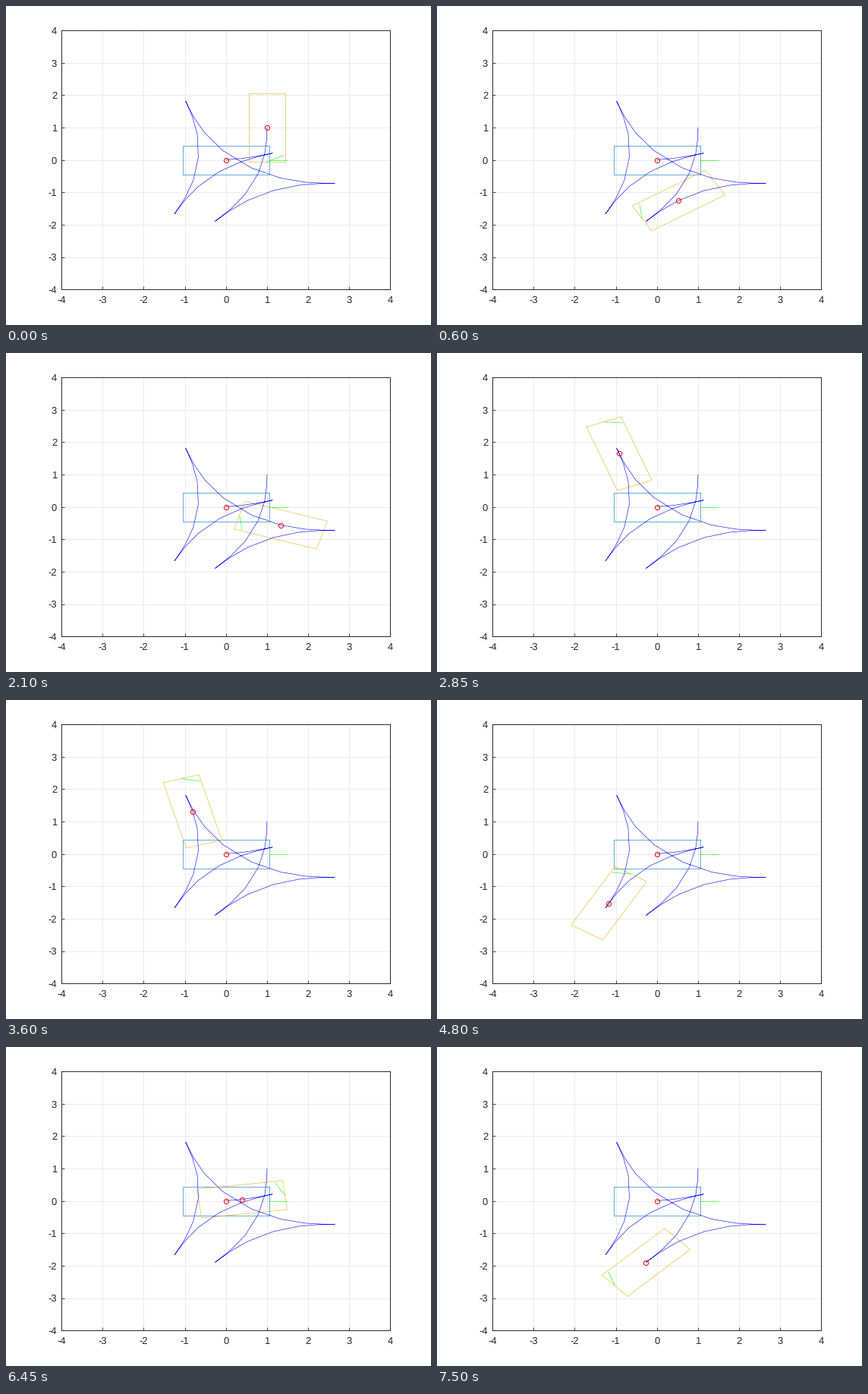
Write a matplotlib script that moves like this. It is 560x420 px and loops after 7.65 s.

```python
import numpy as np
import matplotlib.pyplot as plt
from matplotlib.animation import FuncAnimation

W, H, DPI = 560, 420, 100
PX = 72 / DPI
STEPS = 51
INTERVAL = 150
RAMP = 3.4          # steps the steering needs to reach full lock
PACE = 4.755        # steps per square root of travelled length
# x, y and heading in degrees wherever the car changes direction
CUSPS = [(1, 1, -90), (-.275, -1.905, -136.4), (2.652, -.721, -180.3),
         (-.988, 1.838, -250), (-1.256, -1.676, -299.7),
         (1.135, .212, -345), (0, .01, -356)]


def plan_route():
    """Alternate forward and reverse legs, each with a triangular speed profile."""
    u = np.linspace(0, 1, 401)
    speed = 1 - abs(2 * u - 1)
    legs, start = [], 0.0
    for k, (a, b) in enumerate(zip(CUSPS, CUSPS[1:])):
        sign = 1 if k % 2 == 0 else -1
        chord = complex(b[0] - a[0], b[1] - a[1])
        turn = np.radians(b[2] - a[2])
        duration = PACE * np.sqrt(abs(chord) * (1 + turn ** 2 / 22))
        lock = np.minimum(1, speed * duration / 2 / RAMP)
        swing = np.cumsum(lock * speed)
        theta = np.radians(a[2]) + turn * swing / swing[-1]
        trail = np.cumsum(speed * np.exp(1j * theta))
        place = complex(a[0], a[1]) + trail * chord / trail[-1]
        accel = np.where(u < .5, sign, -sign)
        legs.append((start + u * duration, place.real, place.imag, theta, accel))
        start += duration
    return np.hstack(legs)


time, *route, push = plan_route()
poses = np.array([np.interp(np.arange(STEPS), time, part) for part in route]).T


def car(x, y, heading, wheel):
    """Outline of the body and the wheel line at its nose."""
    c, s = np.cos(heading), np.sin(heading)
    fx = np.array([1.05, 1.05, -1.05, -1.05, 1.05])
    fy = np.array([.45, -.45, -.45, .45, .45])
    body = x + c * fx - s * fy, y + s * fx + c * fy
    nx, ny = x + 1.05 * c, y + 1.05 * s
    aim = heading + wheel
    nose = [nx, nx + .45 * np.cos(aim)], [ny, ny + .45 * np.sin(aim)]
    return body, nose


plt.rcParams.update({"font.family": "Liberation Sans", "font.size": 13.3 * PX,
                     "axes.unicode_minus": False, "text.hinting": "no_hinting",
                     "text.hinting_factor": 1})
fig = plt.figure(figsize=(W / DPI, H / DPI), dpi=DPI, facecolor="white")
ax = fig.add_axes([73.2 / W, 46.7 / H, 433.1 / W, 341.1 / H])
ax.set(xlim=(-4, 4), ylim=(-4, 4), xticks=range(-4, 5), yticks=range(-4, 5))
ax.set_axisbelow(True)
ax.grid(color="#e6e6e6", lw=.6)
ax.tick_params(direction="in", length=4 * PX, width=.6, pad=6 * PX,
               color="#262626", labelcolor="#262626")
ax.tick_params(axis="x", pad=8.5 * PX)
for spine in ax.spines.values():
    spine.set(linewidth=.7, color="#262626")


def thin(color, data=((), ()), z=3):
    return ax.plot(*data, color=color, lw=.42, zorder=z, clip_on=False)[0]


def ring(x=0, y=0):
    return ax.plot([x], [y], "o", ms=6.2 * PX, mfc="none", mec="red",
                   mew=.72, zorder=6)[0]


goal_body, goal_nose = car(0, 0, 0, 0)
thin("#0072bd", goal_body)
thin("#00ff00", goal_nose)
ring()
thin("#0000ff", poses.T[:2], 5)
body_line = thin("#edb120", z=4)
nose_line = thin("#00ff00", z=4)
mover = ring()

# Steps play in text order: 0, 1, 10, 11, ..., 19, 2, 20, ...
order = sorted(range(STEPS), key=str)


def draw(i):
    step = order[i]
    x, y, heading = poses[step]
    accel = push[np.searchsorted(time, step)]
    body, nose = car(x, y, heading, 2 * accel)
    body_line.set_data(*body)
    nose_line.set_data(*nose)
    mover.set_data([x], [y])
    return body_line, nose_line, mover


anim = FuncAnimation(fig, draw, frames=STEPS, interval=INTERVAL,
                     repeat=True, repeat_delay=0)
plt.show()
```
